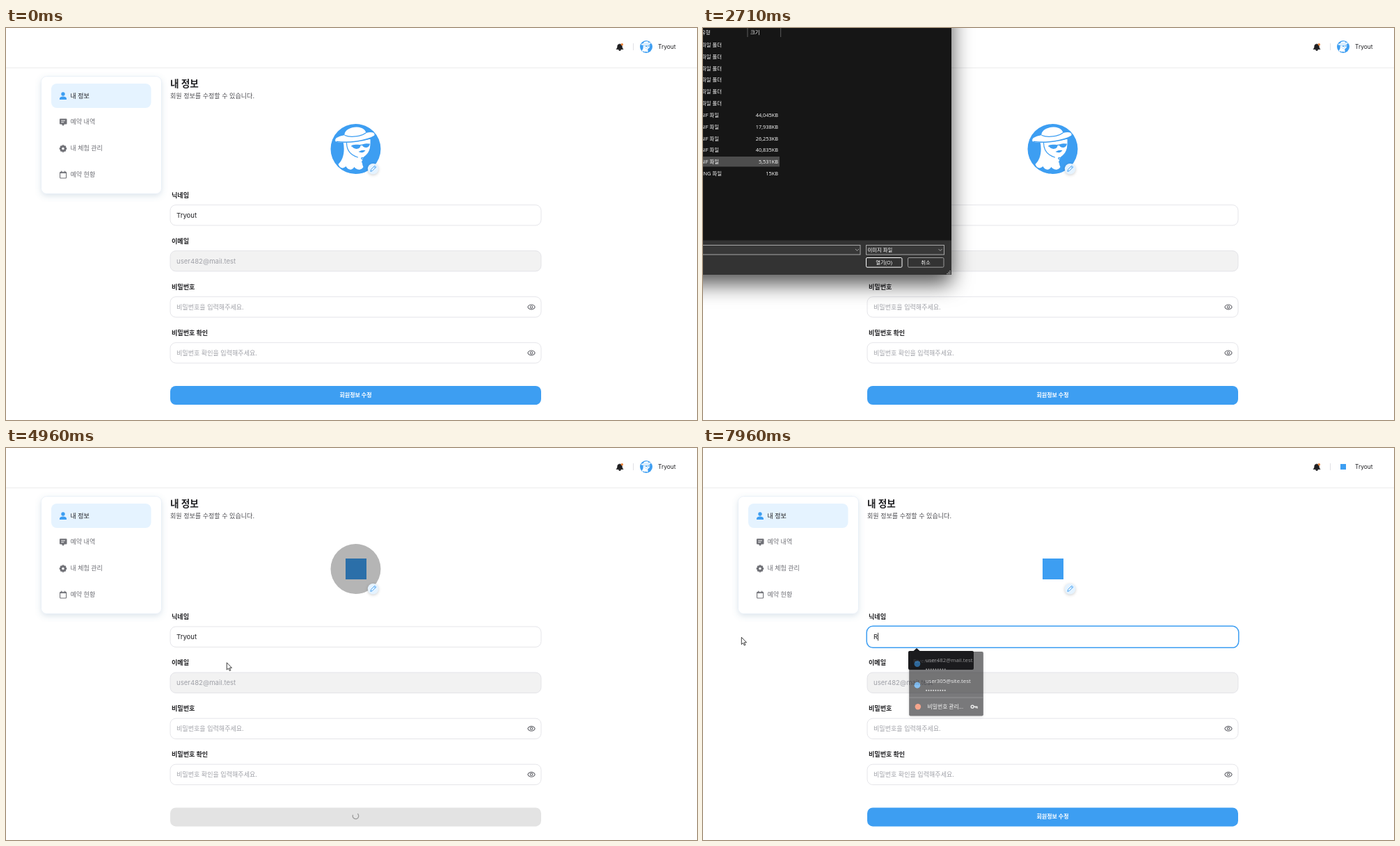
Recreate the animation shown at these times as an HTML page. Size 993 px wide and 564 px high, loop 8 s.

```html
<!DOCTYPE html>
<html lang="ko">
<head>
<meta charset="utf-8">
<title>내 정보</title>
<style>
html, body { margin: 0; width: 100%; height: 100%; overflow: hidden; background: #fff; }
svg { display: block; width: 993px; height: 564px; }
text { font-family: Inter, "Noto Sans CJK KR", sans-serif; font-size: 9.05px; fill: #1f1f22; white-space: pre; }
.en { font-size: 9.6px; }
.b { font-weight: 700; }
.m { font-weight: 500; }
.grey { fill: #707177; }
.hint { fill: #9fa0a7; }
.win text, .pop text { font-family: "Open Sans", "Noto Sans CJK KR", sans-serif; font-size: 7.4px; fill: #fff; }
.pop text { font-size: 8px; fill: #eee; }
.end { text-anchor: end; }
.mid { text-anchor: middle; }
.win .box { fill: #383838; stroke: #a8a8a8; }
.shade { filter: drop-shadow(0 1px 2px rgba(0,0,0,.2)); }
</style>
</head>
<body>
<svg id="stage" viewBox="0 0 993 564"></svg>
<script>
const BLUE = '#3d9ef2', PALE = '#e5f3ff', LOOP = 8000;
const NAME = 'Tryout', MAIL = 'user482@mail.test', MAIL2 = 'user305@site.test';

const text = (x, y, s, cls = '', more = '') => `<text x="${x}" y="${y}" class="${cls}" ${more}>${s}</text>`;
const rect = (x, y, w, h, r, fill, more = '') =>
  `<rect x="${x}" y="${y}" width="${w}" height="${h}" rx="${r}" fill="${fill}" ${more}/>`;
const line = (d, color, w = 1, more = '') =>
  `<path d="${d}" fill="none" stroke="${color}" stroke-width="${w}" stroke-linecap="round" stroke-linejoin="round" ${more}/>`;
const dots = y => line(`M320.5 ${y}h27.5`, '#ddd', 2, 'stroke-dasharray="0 3.4"');
const eye = y => `<g transform="translate(755 ${y})">` +
  line('M-5.2 0C-3-4.6 3-4.6 5.2 0C3 4.6-3 4.6-5.2 0Z', '#707177', 1.1) +
  '<circle r="1.7" fill="none" stroke="#707177" stroke-width="1.1"/></g>';

const field = (y, label, value, cls, fill = '#fff') =>
  text(238, y - 10.3, label, 'b') +
  rect(236, y + .3, 533, 29.4, 8, fill, 'stroke="#dfdfe4" stroke-width=".8"') +
  text(245, y + 18.2, value, cls);

const avatar = `<g id="avatar"><circle r="36" fill="${BLUE}"/>
  <path fill="#fff" d="M-18-11C-15 4-18 16-25 22C-23 28-18 29-14 25C-11 31-5 31-2 26C2 31 8 31 11 26C8 20 10 15 12 12C20 8 22-2 21-14Z"/>
  <path fill="#fff" d="M-29-11C-31-16-24-18-16-20C-17-32 12-37 15-23C22-25 28-24 27-20C25-13-22-5-29-11Z"/>
  ${line('M-15.500-19.500C-7-16 8-18 14.500-23', BLUE, 1.3)}
  ${line('M-27-10.500C-10-8 16-12 26-18', BLUE, 1.5)}
  ${line('M-13-9C-13 2-7 9 3 12M22-12C22 0 20 6 12 12', BLUE, 1.2)}
  ${line('M-6-4L20-7', BLUE, 1.2)}
  <path fill="${BLUE}" d="M-6-5C1-7 6-6 7-5C7 1-3 2-6-5ZM9-6Q14-9 20-7C20-1 11 0 9-6ZM4 4Q9 1 14 2Q11 7 4 4Z"/>
  ${line('M12 13C6 10 8 18 12 13C17 7 20 11 12 13L9 19M12 13L16 18', BLUE, 1.2)}</g>`;

const header = `<path d="M0 57.300H993" stroke="#eaeaec"/>
  <path d="M877 30.500C879 29 878.500 27 879 25C879.500 22.500 884.500 22.500 885 25C885.500 27 885 29 887 30.500ZM880.500 31h3a1.500 1.500 0 0 1-3 0Z" fill="#1f1f22" stroke="#1f1f22" stroke-width=".7"/>
  <circle cx="885.300" cy="23.700" r="1.700" fill="#e9853c"/>
  <path d="M901.500 22v10" stroke="#e0e0e5"/>
  <use id="headFace" href="#avatar" transform="translate(920 27) scale(.25)"/>
  ${rect(916, 23, 8, 8, 0, BLUE, 'id="headMark"')}
  ${text(937, 30, NAME, '', 'style="font-size:8.4px"')}`;

const teeth = [0, 45, 90, 135].map(a => rect(-1.4, -5.2, 2.8, 10.4, .6, '#707177', `transform="rotate(${a})"`)).join('');
const side = `<g filter="url(#soft)">${rect(50.5, 69.5, 173, 169, 8, '#fff', 'stroke="#e6eef6" stroke-width=".8"')}</g>
  ${rect(65, 80, 143.5, 35, 8, PALE)}
  <g fill="${BLUE}"><circle cx="82" cy="95" r="2.700"/><path d="M77 103v-1.500c0-4 10-4 10 0v1.500z"/></g>
  <path d="M78 130.500h8.500q1 0 1 1v6q0 1-1 1h-2.500l-2 2.500-2-2.500h-2q-1 0-1-1v-6q0-1 1-1z" fill="#707177"/>
  ${line('M79.600 133.300h5M79.600 135.700h3.200', '#fff', .9)}
  <g transform="translate(82 173.500)">${teeth}<circle r="4" fill="#707177"/><circle r="1.700" fill="#fff"/></g>
  ${rect(77.6, 207.300, 9, 8.700, 1, 'none', 'stroke="#707177" stroke-width="1.1"')}
  ${line('M77.600 208.300h9M79.600 206v1.500M84.600 206v1.500', '#707177', 1.2)}
  ${text(92.5, 100.5, '내 정보', 'm')}
  ${['예약 내역', '내 체험 관리', '예약 현황'].map((s, i) => text(92.5, 138.4 + i * 37.9, s, 'grey m')).join('')}`;

const profile = `${text(236, 85, '내 정보', 'b', 'style="font-size:13.6px"')}
  ${text(236, 101.4, '회원 정보를 수정할 수 있습니다.', '', 'style="fill:#4b4b50"')}
  <use id="face" href="#avatar" transform="translate(502.5 174)"/>
  <circle id="veil" cx="502.500" cy="174" r="36" fill="#b5b5b5"/>
  ${rect(488, 159, 30, 30, 0, BLUE, 'id="mark"')}
  <circle cx="527.500" cy="202.700" r="7.700" fill="${PALE}" class="shade"/>
  ${line('M524 206l.7-2.600 5.200-5.200 1.900 1.900-5.200 5.200zM528.700 199.400l1.900 1.900', BLUE, .9)}`;

const form = `<g id="form">
  ${field(254.3, '닉네임', '', 'en')}
  ${rect(235.2, 253.9, 534.6, 31, 9, '#fff', `id="ring" stroke="${BLUE}" stroke-width="1.5"`)}
  ${rect(245, 262.500, 27, 13, 0, '#3390ff', 'id="sel"')}
  ${text(245, 272.6, NAME, 'en', 'id="nick"')}
  ${rect(272, 263.400, .8, 11.500, 0, '#111', 'id="caret"')}
  ${field(320.3, '이메일', MAIL, 'en hint', '#f2f2f2')}
  ${field(386.4, '비밀번호', '비밀번호을 입력해주세요.', 'hint')}${eye(401.4)}
  ${field(452.4, '비밀번호 확인', '비밀번호 확인을 입력해주세요.', 'hint')}${eye(467.4)}
  ${rect(236, 515, 533, 27, 8, BLUE, 'id="send"')}
  ${text(502.5, 531, '회원정보 수정', 'b mid', 'id="sendText" style="font-size:8px;fill:#fff"')}
  <g id="spin">${line('M0-4.300A4.300 4.300 0 1 1-3.700 2.200', '#9a9a9a', 1.3)}</g></g>`;

const menu = `<g id="menu">${rect(521, 213.500, 77, 27, 5, '#fff', 'class="shade" stroke="#c3c8d0" stroke-width=".8"')}
  ${rect(523.5, 216, 72, 22, 4, PALE, 'id="menuItem"')}
  ${text(528, 230, '이미지 변경', 'm', 'style="font-size:8px"')}</g>`;

const account = (y, mail) => `<circle cx="307" cy="${y}" r="4.500" fill="${BLUE}"/>${text(319, y - 3, mail)}${dots(y + 7.7)}`;
const popups = `<g id="hintBox" class="pop">
  <path d="M302 292.500l5-4.500 5 4.500z" fill="#1b1b1e"/>${rect(295, 292, 94, 27, 2, '#1b1b1e')}
  ${text(302, 308.500, 'Rivemolto', '', 'style="fill:#77777b"')}</g>
  <g id="pop" class="pop"><path d="M302 292.500l5-4.500 5 4.500z" fill="#1b1b1e"/>
  ${rect(295, 292, 109, 94.500, 2, '#1b1b1e', 'class="shade"')}
  ${account(310, MAIL)}${account(341.3, MAIL2)}
  <path d="M295 359.500h109" stroke="#5a5a5e" stroke-width=".8"/>
  <circle cx="308" cy="373" r="4.300" fill="#f0663c"/>${text(322, 376, '비밀번호 관리...')}
  <circle cx="388" cy="373" r="2" fill="none" stroke="#ddd" stroke-width="1.500"/>${line('M390.500 373h4.500v2M393 373v1.500', '#ddd', 1.4)}</g>`;

const sizes = ['44,045', '17,938', '26,253', '40,835', '5,531', '15'];
const rowY = i => 27 + i * 16.82;
const chevron = x => line(`M${x - 2.3} 318.200l2.300 2.300 2.300-2.300`, '#bbb', .8);
const rows = Array.from({ length: 12 }, (_, i) =>
  i < 6 ? text(27, rowY(i), '파일 폴더', 'end')
    : text(i < 11 ? 23 : 27, rowY(i), (i < 11 ? 'GIF' : 'PNG') + ' 파일', 'end') +
      text(108, rowY(i), sizes[i - 6] + 'KB', 'end')).join('');
const win = `<g id="win" class="win"><g filter="url(#deep)">${rect(-400, -200, 757, 555, 0, '#191919')}</g>
  ${rect(-2, 305.500, 359, 49.500, 0, '#333')}
  <path d="M64 0v13M111.700 0v13" stroke="#5a5a5a"/>
  ${rect(0, 185, 110, 14.500, 0, '#4d4d4d', 'id="rowA"')}${rect(0, 201.700, 110, 14.500, 0, '#4d4d4d', 'id="rowB"')}
  ${text(10.5, 8.5, '유형', 'end')}${text(68, 8.5, '크기')}${rows}
  ${rect(-50, 312.500, 276, 13.500, 0, '', 'class="box"')}${chevron(221.5)}
  ${rect(234.5, 312.500, 112, 13.500, 0, '', 'class="box"')}${chevron(341)}${text(236.500, 321.700, '이미지 파일')}
  ${rect(234.5, 330.500, 51.500, 13.700, 1.5, '#333', 'id="open" stroke="#fff"')}
  ${rect(294.5, 330.500, 51.500, 13.700, 1.5, '#333', 'stroke="#9b9b9b"')}
  ${text(260, 339.900, '열기(O)', 'mid')}${text(320, 339.900, '취소', 'mid')}
  <path d="M355 349v1.200M353 351v1.200M355 351v1.200M351 353v1.200M353 353v1.200M355 353v1.200" stroke="#ccc" stroke-width="1.200"/></g>`;

const cursor = `<g id="cursor"><path id="arrow" d="M.3.300V10.600L2.700 8.400 4.300 12 5.900 11.300 4.300 7.800H7.500Z" fill="#fff" stroke="#111" stroke-width=".8" stroke-linejoin="round"/>
  <g id="beam">${line('M-2-5.500Q0-5.500 0-4.500Q0-5.500 2-5.500M0-4.500V4.500M-2 5.500Q0 5.500 0 4.500Q0 5.500 2 5.500', '#222', .9)}</g></g>`;

const stage = document.getElementById('stage');
stage.innerHTML = `<defs>${avatar}
  <filter id="soft" x="-20%" y="-20%" width="140%" height="140%"><feDropShadow dx="0" dy="3" stdDeviation="4" flood-color="#5a7f9f" flood-opacity=".2"/></filter>
  <filter id="deep" x="-10%" y="-10%" width="120%" height="125%"><feDropShadow dx="0" dy="13" stdDeviation="15" flood-opacity=".68"/></filter></defs>
  ${rect(0, 0, 993, 564, 0, '#fff')}${header}${side}${profile}${form}${menu}${popups}${win}${cursor}`;

const el = {};
stage.querySelectorAll('[id]').forEach(n => el[n.id] = n);
const set = (id, name, v) => el[id].setAttribute(name, v);
const show = (id, on) => set(id, 'opacity', +on);
const clamp = (v, a = 0, b = 1) => Math.min(b, Math.max(a, v));
const within = (t, a, b) => t >= a && t < b;

// Pointer stops: time, x, y
const path = [
  [260, 995, 566], [640, 700, 330], [1000, 527, 203], [1120, 527, 203], [1480, 538, 224], [1840, 540, 225],
  [2180, 540, 225], [2560, -14, 192], [2930, -14, 192], [2980, -14, 209], [3560, -14, 209], [4050, 264, 341],
  [4300, 262, 338], [4480, 262, 338], [4940, 317, 308.5], [5230, 317, 308.5], [5410, 340, 271], [5500, 340, 271],
  [5830, 426, 309.5], [6060, 426, 309.5], [6200, 460, 322], [6410, 528, 272], [6620, 528, 272],
  [6960, 250, 268], [7160, 30, 250], [7350, 56, 272], [7490, 55, 272]
];

function pointer(t) {
  const i = path.findIndex(p => p[0] > t);
  if (i < 1) return path[i ? path.length - 1 : 0].slice(1);
  const [t0, x0, y0] = path[i - 1], [t1, x1, y1] = path[i];
  const k = (t - t0) / (t1 - t0), e = k * k * (3 - 2 * k);
  return [x0 + (x1 - x0) * e, y0 + (y1 - y0) * e];
}

function draw(t) {
  const [x, y] = pointer(t);
  const uploaded = t >= 4620, loading = within(t, 4620, 5100), focus = t >= 5440, typed = t >= 7890;
  const shift = uploaded ? 2.4 : 0;

  const inField = within(x, 236, 769) && within(y, 254 + shift, 284 + shift) && !within(t, 1000, 5230);
  set('cursor', 'transform', `translate(${x} ${y})`);
  show('cursor', t >= 260);
  show('arrow', !inField);
  show('beam', inField);

  show('menu', within(t, 1100, 1800));
  show('menuItem', t >= 1330);

  show('win', 0);
  set('win', 'opacity', clamp((t - 2200) / 130) * clamp((4590 - t) / 130));
  show('rowA', within(t, 2480, 2980));
  show('rowB', t >= 2980);
  set('rowB', 'fill', t < 3380 ? '#4d4d4d' : t < 3600 ? '#626262' : '#333');
  set('open', 'fill', t >= 4000 ? '#666' : '#333');
  set('open', 'stroke', t >= 4000 ? '#9b9b9b' : '#fff');

  show('face', !uploaded);
  show('mark', uploaded);
  show('veil', loading);
  set('mark', 'fill', loading ? '#2b6fa9' : BLUE);
  show('headFace', t < 5100);
  show('headMark', t >= 5100);

  set('form', 'transform', `translate(0 ${shift})`);
  set('send', 'fill', loading ? '#e3e3e3' : BLUE);
  show('sendText', !loading);
  show('spin', loading);
  set('spin', 'transform', `translate(502.500 527) rotate(${t * .36 + 60})`);

  el.nick.textContent = typed ? 'R' : NAME;
  const end = 245 + el.nick.getComputedTextLength();
  const from = t >= 6960 ? 245 : clamp(x, 245, end);
  const selecting = within(t, 6700, 7890) && from < end;
  show('ring', focus);
  show('sel', selecting);
  set('sel', 'x', from);
  set('sel', 'width', end - from);
  el.nick.style.fill = selecting && from < 250 ? '#fff' : '';
  set('caret', 'x', end + .1);
  show('caret', focus && !selecting && (typed || (t - 5440) % 1000 < 500));

  const fade = clamp((t - 7890) / 150);
  set('pop', 'opacity', clamp((t - 5480) / 100) * (1 - fade * .88));
  set('pop', 'transform', `translate(349.500 339) scale(${1 - fade * .045}) translate(-349.500 -339)`);
  show('hintBox', typed);
}

const start = performance.now();
function tick() {
  draw((performance.now() - start) % LOOP);
  requestAnimationFrame(tick);
}
tick();
</script>
</body>
</html>
```
